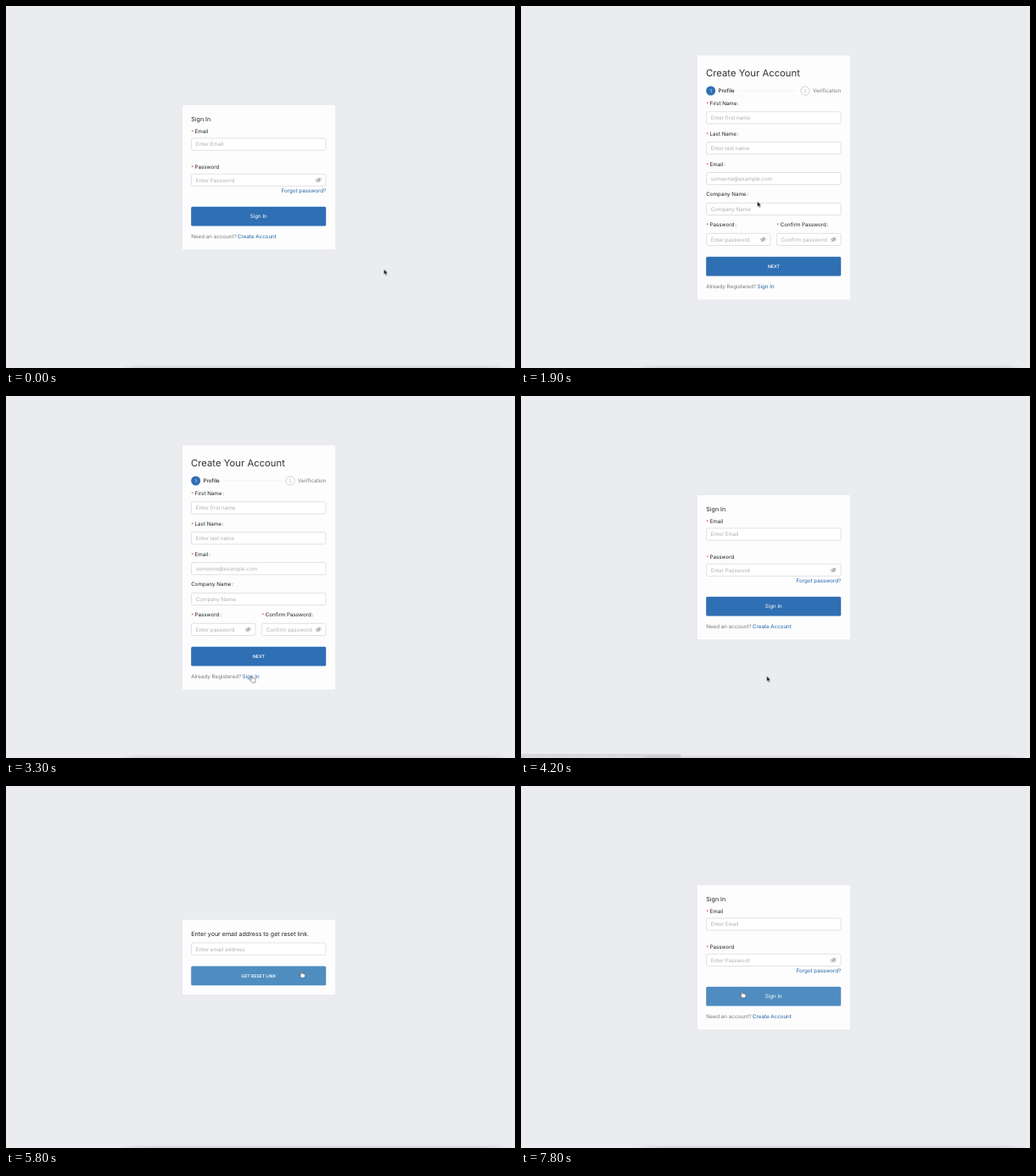
Recreate the animation shown at these times as an HTML page. Size 600 by 427 pixels, loop 8 s.

```html
<!DOCTYPE html>
<html lang="en">
<head>
<meta charset="utf-8">
<title>Sign in flow</title>
<style>
html, body { margin: 0; width: 100%; height: 100%; overflow: hidden; background: #ebecf0; }
svg { display: block; width: 600px; height: 427px; }
text { font: 6.22px Inter, sans-serif; fill: #222; text-rendering: geometricPrecision; white-space: pre; }
.card { fill: #fdfdfd; }
.field { fill: #fff; stroke: #d6d6d9; stroke-width: .7; rx: 1.7px; }
.btn { fill: #2f6fb3; rx: 1.6px; }
.hint { fill: #afafb2; }
.muted { fill: #77787b; }
.link { fill: #1f62a5; }
.star { fill: #e8303a; font-size: 5.2px; }
.on { fill: #fff; text-anchor: middle; }
.caps { font-size: 5.1px; font-weight: 600; }
.head { font-size: 7.1px; }
.title { font-size: 11.3px; fill: #333; }
.step { font-size: 5px; text-anchor: middle; }
.active { font-weight: 500; }

/* one 8 s loop for every moving part */
.page, .shape, .hover, #pointer, #status { animation: 8s linear infinite; }
.page, .shape { animation-timing-function: step-end; }
#login { animation-name: login; }
#create { animation-name: create; }
#reset { animation-name: reset; }
@keyframes login { 0%, 46.25%, 90%, 100% { visibility: visible } 16.25%, 63.125% { visibility: hidden } }
@keyframes create { 0%, 46.25%, 100% { visibility: hidden } 16.25% { visibility: visible } }
@keyframes reset { 0%, 90%, 100% { visibility: hidden } 63.125% { visibility: visible } }

#status { animation-name: status; }
@keyframes status {
  0%, 13.75%, 23.5%, 43.5%, 52.8%, 61%, 68.75%, 100% { opacity: 0 }
  15%, 21.25%, 45%, 50%, 62.25%, 65.6% { opacity: 1 }
}

#signBtn { animation-name: signBtn; }
#nextBtn { animation-name: nextBtn; }
#linkBtn { animation-name: linkBtn; }
@keyframes signBtn { 0%, 55.4%, 60%, 90.2% { fill: #2f6fb3 } 56.6% { fill: #3b7ab8 } 94.5%, 100% { fill: #4f8dc1 } }
@keyframes nextBtn { 0%, 31.3%, 39.5%, 100% { fill: #2f6fb3 } 35% { fill: #4f8dc1 } }
@keyframes linkBtn { 0%, 63.7%, 78.75%, 100% { fill: #2f6fb3 } 67.5%, 76.2% { fill: #4f8dc1 } }
#firstField { animation-name: firstField; }
#passField { animation-name: passField; }
@keyframes firstField { 0%, 26.6%, 31.25%, 100% { stroke: #d6d6d9 } 28.4% { stroke: #4f8dc1 } }
@keyframes passField { 0%, 16.25%, 23.7%, 100% { stroke: #d6d6d9 } 17.5%, 21.9% { stroke: #4f8dc1 } }

#pointer { animation-name: move; }
@keyframes move {
  0%, 2.5% { transform: translate(445.4px, 310.4px); animation-timing-function: ease-in-out }
  12.5%, 21.25% { transform: translate(277px, 270.2px); animation-timing-function: ease-in }
  23.75% { transform: translate(278.4px, 230.9px) }
  25.6% { transform: translate(296px, 165px) }
  27.5% { transform: translate(340px, 128px) }
  29.4% { transform: translate(382px, 195px) }
  31.25% { transform: translate(352px, 298px); animation-timing-function: ease-out }
  41.25%, 52.5% { transform: translate(289.6px, 330.3px); animation-timing-function: ease-in-out }
  57.5% { transform: translate(362px, 221px); animation-timing-function: ease-out }
  60%, 71.25% { transform: translate(353.4px, 217px); animation-timing-function: ease-in-out }
  78.75%, 100% { transform: translate(260.5px, 242.1px) }
}
#arrow { animation-name: arrow; }
#hand { animation-name: hand; }
#beam { animation-name: beam; }
@keyframes arrow {
  0%, 22%, 28.2%, 34.5%, 46.25%, 56.5%, 76.2% { visibility: visible }
  11.8%, 26.8%, 31.25%, 38%, 55.4%, 57.3%, 90%, 100% { visibility: hidden }
}
@keyframes hand {
  0%, 16.25%, 34.5%, 46.25%, 56.5%, 76.2% { visibility: hidden }
  11.8%, 31.25%, 38%, 55.4%, 57.3%, 90%, 100% { visibility: visible }
}
@keyframes beam { 0%, 22%, 28.2%, 100% { visibility: hidden } 16.25%, 26.8% { visibility: visible } }
</style>
</head>
<body>
<svg viewBox="0 0 600 427">
  <defs>
    <filter id="soft" x="-10%" y="-200%" width="120%" height="500%"><feGaussianBlur stdDeviation="9 2.6"/></filter>
    <g id="eye" fill="none" stroke="#858588" stroke-width=".6" stroke-linecap="round">
      <path d="M-3 0Q0-4.2 3 0Q0 4.2-3 0ZM-2.4 2.6L2.5-2.5"/>
      <circle r="1"/>
    </g>
  </defs>
  <rect width="600" height="427" fill="#ebecf0"/>
  <rect x="145" y="427" width="438" height="10" fill="#000" opacity=".22" filter="url(#soft)"/>

  <g id="login" class="page">
    <rect class="card" x="208" y="117" width="180" height="170"/>
    <text class="head" x="218.3" y="135.6">Sign In</text>
    <text x="218.5" y="149.9"><tspan class="star">*</tspan><tspan x="222.6">Email</tspan></text>
    <rect class="field" x="218.5" y="156" width="158.5" height="14.2"/>
    <text class="hint" x="223.7" y="165.4">Enter Email</text>
    <text x="218.5" y="192.2"><tspan class="star">*</tspan><tspan x="222.6">Password</tspan></text>
    <rect class="field" x="218.5" y="198.2" width="158.5" height="14.2"/>
    <text class="hint" x="223.7" y="207.6">Enter Password</text>
    <use href="#eye" x="368.5" y="205.3"/>
    <text class="link" x="377.2" y="219.9" text-anchor="end">Forgot password?</text>
    <rect id="signBtn" class="btn hover" x="218.2" y="236.7" width="159" height="22.8"/>
    <text class="on" x="297.7" y="250.4">Sign In</text>
    <text class="muted" x="218.3" y="273.9">Need an account?</text>
    <text class="link" x="273" y="273.9">Create Account</text>
  </g>

  <g id="create" class="page">
    <rect class="card" x="208" y="58.3" width="180" height="288"/>
    <text class="title" x="218" y="83.2">Create Your Account</text>
    <circle cx="223.7" cy="100" r="5.5" fill="#2f6fb3"/>
    <text class="step on" x="223.7" y="101.9">1</text>
    <text class="active" x="232.5" y="102.2">Profile</text>
    <path d="M258 100H324" stroke="#e6e6e8" stroke-width=".6"/>
    <circle cx="335" cy="100" r="5.2" fill="#fff" stroke="#b5b5b8" stroke-width=".6"/>
    <text class="step hint" x="335" y="101.9">2</text>
    <text class="muted" x="344" y="102.2">Verification</text>

    <text x="218.5" y="116.7"><tspan class="star">*</tspan><tspan x="222.6">First Name</tspan><tspan dx=".8">:</tspan></text>
    <rect id="firstField" class="field hover" x="218.5" y="124.7" width="158.5" height="14.2"/>
    <text class="hint" x="223.7" y="134.1">Enter first name</text>

    <text x="218.5" y="152.6"><tspan class="star">*</tspan><tspan x="222.6">Last Name</tspan><tspan dx=".8">:</tspan></text>
    <rect class="field" x="218.5" y="160.6" width="158.5" height="14.2"/>
    <text class="hint" x="223.7" y="170">Enter last name</text>

    <text x="218.5" y="188.5"><tspan class="star">*</tspan><tspan x="222.6">Email</tspan><tspan dx=".8">:</tspan></text>
    <rect class="field" x="218.5" y="196.5" width="158.5" height="14.2"/>
    <text class="hint" x="223.7" y="205.9">someone@example.com</text>

    <text x="218.3" y="224.4">Company Name<tspan dx=".8">:</tspan></text>
    <rect class="field" x="218.5" y="232.4" width="158.5" height="14.2"/>
    <text class="hint" x="223.7" y="241.8">Company Name</text>

    <text x="218.5" y="260.3"><tspan class="star">*</tspan><tspan x="222.6">Password</tspan><tspan dx=".8">:</tspan></text>
    <rect id="passField" class="field hover" x="218.5" y="268.3" width="75.5" height="14.2"/>
    <text class="hint" x="223.7" y="277.7">Enter password</text>
    <use href="#eye" x="285.4" y="275.4"/>

    <text x="301.6" y="260.3"><tspan class="star">*</tspan><tspan x="305.7">Confirm Password</tspan><tspan dx=".8">:</tspan></text>
    <rect class="field" x="301.6" y="268.3" width="75.4" height="14.2"/>
    <text class="hint" x="306.8" y="277.7">Confirm password</text>
    <use href="#eye" x="368.5" y="275.4"/>

    <rect id="nextBtn" class="btn hover" x="218.2" y="295.8" width="159" height="22.8"/>
    <text class="on caps" x="297.9" y="309.1">NEXT</text>
    <text class="muted" x="218.3" y="333.1">Already Registered?</text>
    <text class="link" x="278.5" y="333.1">Sign In</text>
  </g>

  <g id="reset" class="page">
    <rect class="card" x="208" y="158" width="180" height="88"/>
    <text class="head" x="218.3" y="176.5">Enter your email address to get reset link.</text>
    <rect class="field" x="218.5" y="185" width="158.5" height="14.2"/>
    <text class="hint" x="223.7" y="194.5">Enter email address</text>
    <rect id="linkBtn" class="btn hover" x="218.2" y="212.5" width="159" height="22.8"/>
    <text class="on caps" x="297.7" y="225.9">GET RESET LINK</text>
  </g>

  <g id="status">
    <path d="M0 422.3H186.5Q188.3 422.3 188.3 424V427H0Z" fill="#2b2c2f"/>
    <text x="6" y="429.3" style="font-size:5.7px;fill:#d8d8da">//portal.plans.example.com/admin/forgot/password</text>
  </g>

  <g id="pointer" stroke-linejoin="round">
    <path id="arrow" class="shape" d="M0 0V6.5L1.5 5.1L2.6 7.6L3.8 7.1L2.7 4.7H4.7Z" fill="#000" stroke="#fff" stroke-width=".5"/>
    <path id="hand" class="shape" fill="#fff" stroke="#222" stroke-width=".5"
      d="M-.8 4.6V.9Q0-.2 .8 .9V2.8Q1.6 2.2 2.1 3Q2.9 2.5 3.4 3.3Q4.5 3 4.6 4.2Q4.7 5.8 3.8 7.8H.2Q-1 6.2-2.3 4.7Q-2.4 3.5-.8 4.6Z"/>
    <path id="beam" class="shape" d="M-1.2-3.5Q0-3.5 0-2.7Q0-3.5 1.2-3.5M0-2.7V2.9M-1.2 3.7Q0 3.7 0 2.9Q0 3.7 1.2 3.7" fill="none" stroke="#222" stroke-width=".6"/>
  </g>
</svg>
</body>
</html>
```
